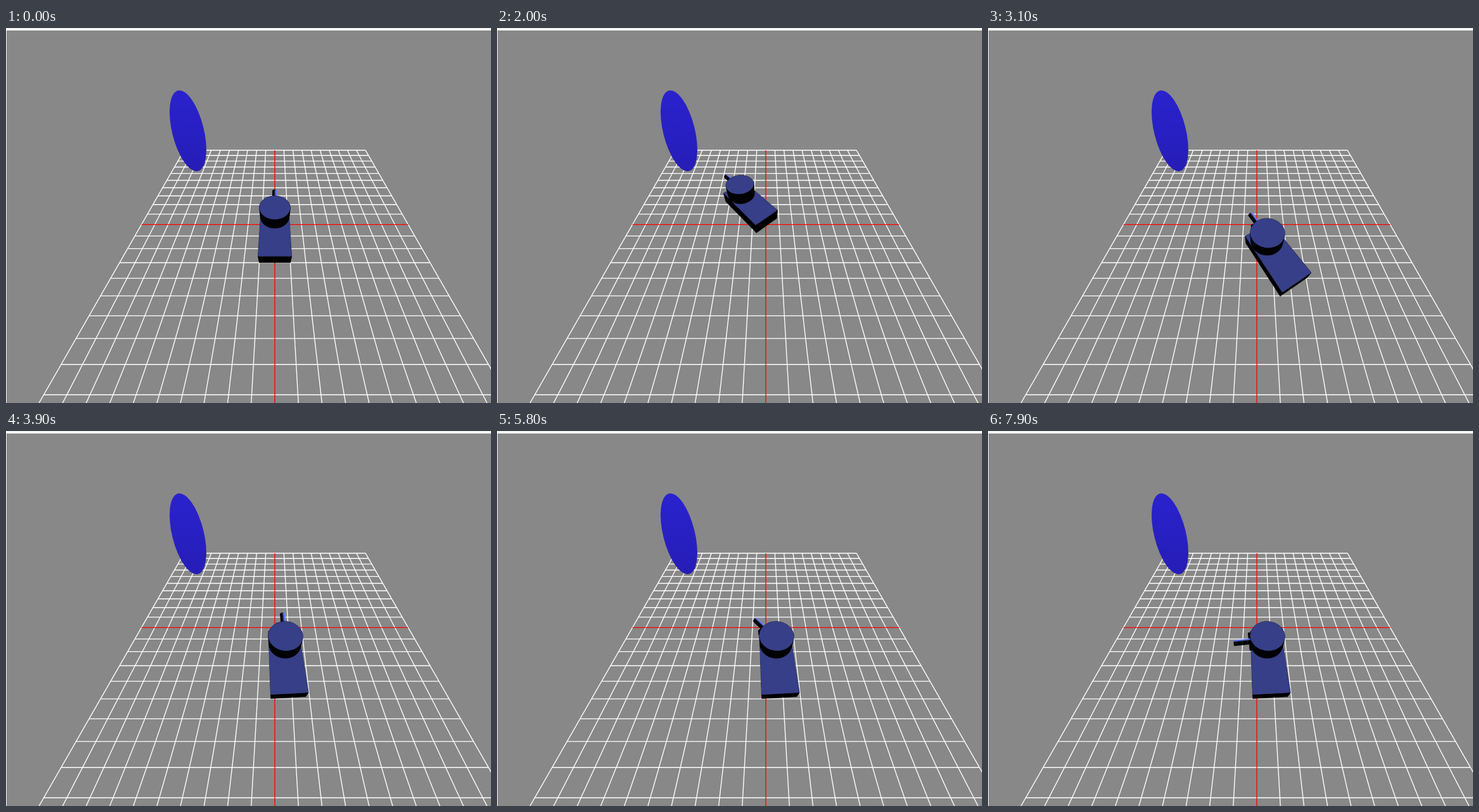
Recreate the animation shown at these times as an HTML page with a canvas. Size 765 by 592 pixels, loop 8000 ms.

```html
<!DOCTYPE html>
<html lang="en">
<head>
<meta charset="utf-8">
<title>Tank on a grid</title>
<style>
  html, body { margin: 0; width: 100%; height: 100%; overflow: hidden; background: #888; }
  canvas { display: block; }
</style>
</head>
<body>
<canvas id="stage" width="765" height="592"></canvas>
<script>
const ctx = document.getElementById('stage').getContext('2d');
const LOOP = 8000, STEP = 100;
const BLUE = [54, 63, 135];
const LIGHT = [0.45, 0.22, -1];

// Camera at (0, 10, 7), looking at the origin with a 100 degree field of view.
const CENTER = [424, 310.3], FOCAL = 256.8;
const DIST = Math.hypot(10, 7), SIN = 10 / DIST, COS = 7 / DIST;

// Each row: time, then value(s); linear in between.
const BODY_TURN = [[400, 0], [1500, 40.9], [2000, 40.9], [2200, 31.4], [3100, 31.4], [3900, 2.9]];
const GUN_TURN = [...BODY_TURN, [5000, 45], [5320, 57], [5800, 41.4], [5950, 36],
                  [6050, 36], [6800, 61.5], [7900, 97]];
const PLACE = [[1500, 0, 0], [2000, -1.887, -2.184], [2300, -1.887, -2.184], [3100, 0.626, 1.94]];

function valueAt(keys, t) {
  if (t <= keys[0][0]) return keys[0].slice(1);
  for (let i = 1; i < keys.length; i++) {
    const a = keys[i - 1], b = keys[i];
    if (t <= b[0]) {
      const k = (t - a[0]) / (b[0] - a[0]);
      return a.slice(1).map((v, j) => v + (b[j + 1] - v) * k);
    }
  }
  return keys[keys.length - 1].slice(1);
}

function project([x, y, z]) {
  const scale = FOCAL / (DIST - SIN * y - COS * z);
  return [CENTER[0] + x * scale, CENTER[1] + (SIN * z - COS * y) * scale];
}

function trace(points) {
  ctx.beginPath();
  points.forEach(p => ctx.lineTo(...project(p)));
}

function line(a, b, color) {
  trace([a, b]);
  ctx.lineWidth = 1.35;
  ctx.strokeStyle = color;
  ctx.stroke();
}

function face(points, color) {
  trace(points);
  ctx.closePath();
  ctx.fillStyle = ctx.strokeStyle = color;
  ctx.lineWidth = 0.4;
  ctx.fill();
  ctx.stroke();
}

function shade(amount) {
  const k = Math.max(0, Math.min(2, amount));
  return `rgb(${BLUE.map(c => Math.round(c * k)).join()})`;
}

// Turns local coordinates by a heading and moves them to the tank's place.
function frameOf(degrees, [px, pz]) {
  const a = degrees * Math.PI / 180, s = Math.sin(a), c = Math.cos(a);
  return (x, y, z) => [px + x * c + z * s, y, pz - x * s + z * c];
}

function box(at, x, y0, y1, z0, z1, top) {
  const corners = [[-x, z0], [x, z0], [x, z1], [-x, z1]];
  corners.forEach(([ax, az], i) => {
    const [bx, bz] = corners[(i + 1) % 4];
    face([at(ax, y0, az), at(bx, y0, bz), at(bx, y1, bz), at(ax, y1, az)], '#000');
  });
  face(corners.map(([cx, cz]) => at(cx, y1, cz)), top);
}

function barrel(at) {
  const N = 24, R = 0.16, Y = 1.5, TIP = -2;
  const rim = (i, z) => {
    const a = i / N * 2 * Math.PI;
    return at(R * Math.cos(a), Y + R * Math.sin(a), z);
  };
  const axis = at(0, Y, TIP);
  for (let i = 0; i < N; i++) {
    const mid = rim(i + 0.5, TIP);
    const normal = mid.map((v, j) => (v - axis[j]) / R);
    const facing = -normal[0] * mid[0] + normal[1] * (10 - mid[1]) + normal[2] * (7 - mid[2]);
    if (facing <= 0) continue;
    const lit = normal.reduce((sum, v, j) => sum + v * LIGHT[j], 0);
    face([rim(i, TIP), rim(i + 1, TIP), rim(i + 1, -0.9), rim(i, -0.9)], shade(lit / LIGHT[1]));
  }
}

function turret(at) {
  const N = 48;
  const rim = (i, y) => at(Math.cos(i / N * 2 * Math.PI), y, Math.sin(i / N * 2 * Math.PI));
  for (let i = 0; i < N; i++) {
    face([rim(i, 1), rim(i + 1, 1), rim(i + 1, 2), rim(i, 2)], '#000');
  }
  face(Array.from({ length: N }, (_, i) => rim(i, 2)), shade(1));
}

function drawGrid() {
  for (let i = -10; i <= 10; i++) {
    if (!i) continue;
    line([i, 0, -10], [i, 0, 10], '#fff');
    line([-10, 0, i], [10, 0, i], '#fff');
  }
  line([0, 0, -10], [0, 0, 10], '#f00');
  line([-10, 0, 0], [10, 0, 0], '#f00');
}

function drawDisc() {
  const fill = ctx.createLinearGradient(0, 98, 0, 226);
  fill.addColorStop(0, '#2a22ce');
  fill.addColorStop(1, '#261db6');
  ctx.beginPath();
  ctx.ellipse(287, 162.3, 25, 65.5, -14 * Math.PI / 180, 0, 2 * Math.PI);
  ctx.fillStyle = fill;
  ctx.fill();
}

function draw(t) {
  ctx.fillStyle = '#888';
  ctx.fillRect(0, 0, 765, 592);
  drawGrid();
  drawDisc();

  const place = valueAt(PLACE, t);
  const body = frameOf(valueAt(BODY_TURN, t)[0], place);
  const gun = frameOf(valueAt(GUN_TURN, t)[0], place);
  box(body, 1, 0, 1, -1, 3, shade(1));
  box(gun, 0.47, 1.25, 1.73, -1.1, -0.85, '#000');
  barrel(gun);
  turret(gun);

  ctx.fillStyle = '#f4f6f5';
  ctx.fillRect(0, 0, 765, 4);
  ctx.fillRect(0, 0, 1, 592);
}

const start = performance.now();
function tick() {
  const t = (performance.now() - start) % LOOP;
  draw(Math.floor(t / STEP) * STEP);
  requestAnimationFrame(tick);
}
tick();
</script>
</body>
</html>
```
